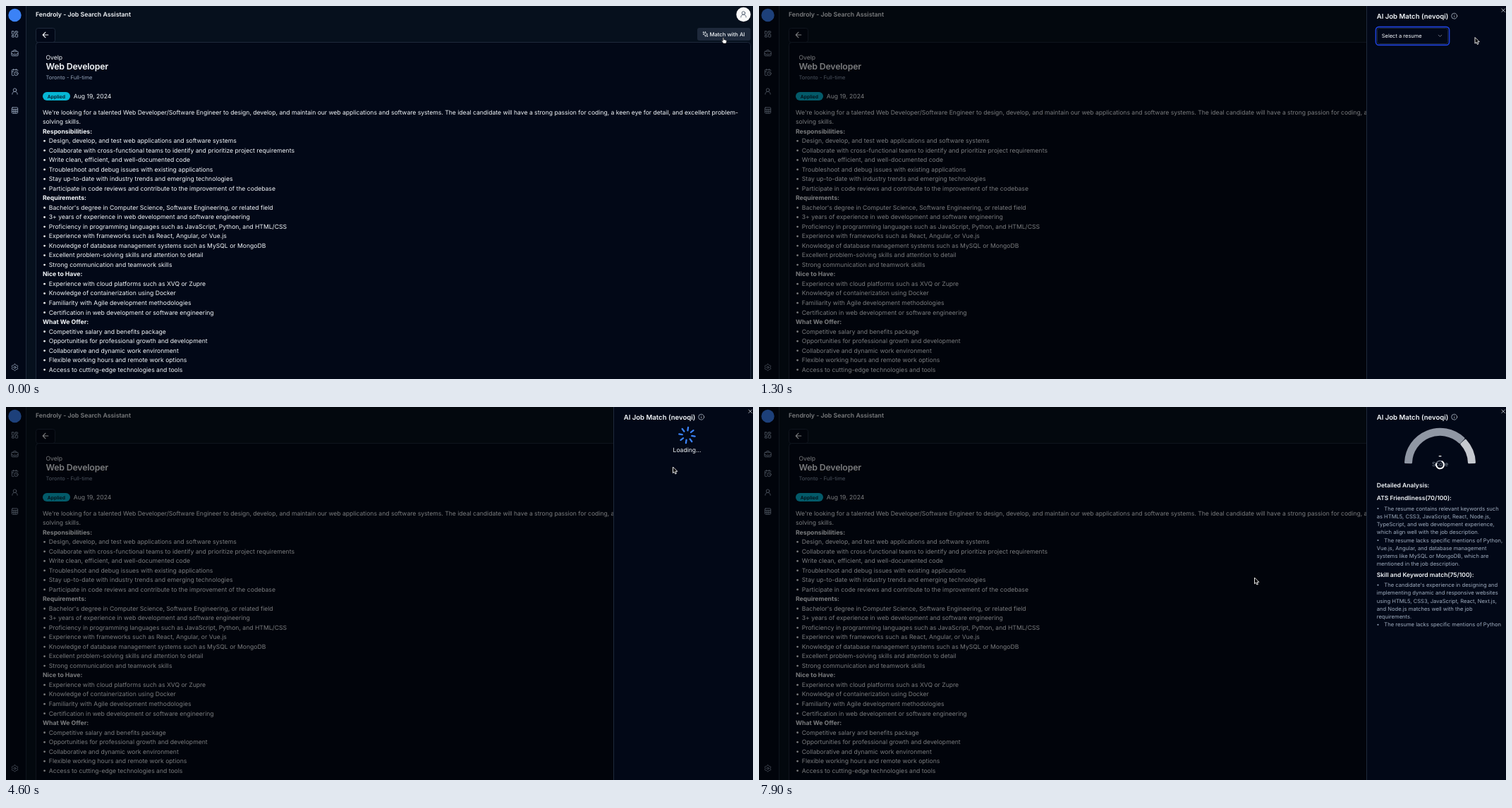
An HTML page that plays this animation: 1059 by 529 pixels, repeating every 8 s.

```html
<!DOCTYPE html>
<html lang="en">
<head>
<meta charset="utf-8">
<title>Job match</title>
<style>
  html, body { margin: 0; height: 100%; overflow: hidden; background: #020817; }
  svg { display: block; width: 100vw; height: 100vh; }
  text { font-family: Inter, sans-serif; text-rendering: geometricPrecision; white-space: pre; }
</style>
</head>
<body>
<svg id="stage" viewBox="0 0 1059 529"></svg>
<script>
const stage = document.getElementById('stage');
const LOOP = 8000, STEP = 100;
const WHITE = '#f5f8fb', MUTED = '#94a3b8', BG = '#020817', LINE = '#1e293b';

const label = (x, y, size, str, { fill = WHITE, weight = 400, extra = '' } = {}) =>
  `<text x="${x}" y="${y}" font-size="${size}" font-weight="${weight}" fill="${fill}" ${extra}>${str}</text>`;
const box = (x, y, w, h, fill, extra = '') =>
  `<rect x="${x}" y="${y}" width="${w}" height="${h}" fill="${fill}" ${extra}/>`;
// 24-unit line icon centred on (cx, cy)
const icon = (cx, cy, size, body, color = MUTED, width = 2) =>
  `<g transform="translate(${cx - size / 2} ${cy - size / 2}) scale(${size / 24})" fill="none"
    stroke="${color}" stroke-width="${width}" stroke-linecap="round" stroke-linejoin="round">${body}</g>`;
const path = d => `<path d="${d}"/>`;
const pane = (x, y, w, h, r = 1) => box(x, y, w, h, 'none', `rx="${r}"`);

const gear = () => {
  const pts = Array.from({ length: 72 }, (_, i) => {
    const a = i * Math.PI / 36, r = 8.9 + 1.2 * Math.cos(6 * a);
    return `${(12 + r * Math.sin(a)).toFixed(2)} ${(12 - r * Math.cos(a)).toFixed(2)}`;
  });
  return path(`M${pts.join('L')}Z`) + '<circle cx="12" cy="12" r="3"/>';
};
const person = '<circle cx="12" cy="8" r="5"/>' + path('M20 21a8 8 0 0 0-16 0');

const sidebar = [
  [40, pane(3, 3, 7, 9) + pane(14, 3, 7, 5) + pane(14, 12, 7, 9) + pane(3, 16, 7, 5)],
  [67, pane(2, 6, 20, 14, 2) + path('M16 6V4a2 2 0 0 0-2-2h-4a2 2 0 0 0-2 2v2M22 13a18 18 0 0 1-20 0M12 12h.01')],
  [94, path('M21 7.5V6a2 2 0 0 0-2-2H5a2 2 0 0 0-2 2v14a2 2 0 0 0 2 2h3.5M16 2v4M8 2v4M3 10h5M17.5 17.5L16 16.3V14') +
       '<circle cx="16" cy="16" r="6"/>'],
  [121, person],
  [148, pane(3, 3, 18, 18, 2) + path('M3 9h18M3 15h18M9 9v12M15 9v12')],
  [512.5, gear()],
];

// '#' marks a heading, '-' a bullet
const posting = `We're looking for a talented Web Developer/Software Engineer to design, develop, and maintain our web applications and software systems. The ideal candidate will have a strong passion for coding, a keen eye for detail, and excellent problem-
solving skills.
#Responsibilities:
-Design, develop, and test web applications and software systems
-Collaborate with cross-functional teams to identify and prioritize project requirements
-Write clean, efficient, and well-documented code
-Troubleshoot and debug issues with existing applications
-Stay up-to-date with industry trends and emerging technologies
-Participate in code reviews and contribute to the improvement of the codebase
#Requirements:
-Bachelor's degree in Computer Science, Software Engineering, or related field
-3+ years of experience in web development and software engineering
-Proficiency in programming languages such as JavaScript, Python, and HTML/CSS
-Experience with frameworks such as React, Angular, or Vue.js
-Knowledge of database management systems such as MySQL or MongoDB
-Excellent problem-solving skills and attention to detail
-Strong communication and teamwork skills
#Nice to Have:
-Experience with cloud platforms such as XVQ or Zupre
-Knowledge of containerization using Docker
-Familiarity with Agile development methodologies
-Certification in web development or software engineering
#What We Offer:
-Competitive salary and benefits package
-Opportunities for professional growth and development
-Collaborative and dynamic work environment
-Flexible working hours and remote work options
-Access to cutting-edge technologies and tools`.split('\n');

const postingLine = (line, i) => {
  const y = 153.6 + i * 13.52, rest = line.slice(1);
  if (line[0] === '#') return label(52, y, 8.7, rest, { weight: 700 });
  if (line[0] === '-') return `<circle cx="54.6" cy="${y - 2.8}" r="1.4" fill="${WHITE}"/>` + label(60.8, y, 8.62, rest);
  return label(52, y, 8.59, line);
};

const page = `
  ${box(0, 0, 1059, 529, '#06101d')}
  ${box(0, 0, 28, 529, BG)}${box(28, 0, 1, 529, LINE)}
  <circle cx="12.5" cy="13" r="9.2" fill="#3b82f6"/>
  ${sidebar.map(([y, body]) => icon(12.5, y, 11, body)).join('')}
  ${label(42, 15.2, 8.75, 'Fendroly - Job Search Assistant', { weight: 600 })}
  <circle cx="1045.5" cy="12" r="10.2" fill="#fafafa"/>
  ${icon(1045.5, 11.8, 11, person, '#475569', 1.8)}
  ${box(42.5, 31.5, 27, 20, BG, `rx="3" stroke="${LINE}"`)}
  ${icon(56, 41, 13, path('M12 19l-7-7 7-7M19 12H5'), WHITE)}
  ${box(980, 31, 75.5, 18, LINE, 'rx="3"')}
  ${icon(991.5, 40, 9, path('M12 3C12.6 8.5 15.5 11.4 21 12 15.5 12.6 12.6 15.5 12 21 11.4 15.5 8.5 12.6 3 12 8.5 11.4 11.4 8.5 12 3ZM5 3v4M3 5h4M19 17v4M17 19h4'), WHITE)}
  ${label(997.5, 42.9, 7.65, 'Match with AI', { weight: 500 })}
  ${box(42.5, 51.5, 1013, 490, BG, `rx="4" stroke="${LINE}"`)}
  ${label(56.5, 75.5, 8.6, 'Ovelp')}
  ${label(56.5, 90.3, 12.35, 'Web Developer', { weight: 600, extra: 'letter-spacing="-.2"' })}
  ${label(56.5, 104.2, 7.52, 'Toronto - Full-time', { fill: MUTED })}
  ${box(52, 122, 39, 12, '#06b6d4', 'rx="6"')}
  ${label(58.8, 130.5, 6.75, 'Applied', { fill: '#06182a', weight: 600 })}
  ${label(95.8, 130.8, 8.6, 'Aug 19, 2024')}
  ${posting.map(postingLine).join('')}`;

const roles = ['Full Stack Developer', 'Software Engineer', 'Software Architect'];
const roleY = i => 66.2 + i * 18;

// Half-ring piece between two angles in degrees, counted from the right
const gaugePiece = (from, to, fill) => {
  const at = (r, deg) => {
    const a = deg * Math.PI / 180;
    return `${(965.5 + r * Math.cos(a)).toFixed(2)} ${(80.3 - r * Math.sin(a)).toFixed(2)}`;
  };
  return `<path d="M${at(49, from)}A49 49 0 0 1 ${at(49, to)}L${at(41, to)}A41 41 0 0 0 ${at(41, from)}Z"
    fill="${fill}" stroke="${fill}" stroke-width="3" stroke-linejoin="round"/>`;
};
const spokes = Array.from({ length: 8 }, (_, i) => `<path d="M0-6.8V-11.3" transform="rotate(${i * 45})"/>`).join('');

const report = `#ATS Friendliness(70/100):
-The resume contains relevant keywords such
as HTML5, CSS3, JavaScript, React, Node.js,
TypeScript, and web development experience,
which align well with the job description.
-The resume lacks specific mentions of Python,
Vue.js, Angular, and database management
systems like MySQL or MongoDB, which are
mentioned in the job description.
#Skill and Keyword match(75/100):
-The candidate's experience in designing and
implementing dynamic and responsive websites
using HTML5, CSS3, JavaScript, React, Next.js,
and Node.js matches well with the job
requirements.
-The resume lacks specific mentions of Python`.split('\n');
let nextY = 132.4, typed = 0;
const reportLines = report.map((raw, i) => {
  const kind = '#-'.includes(raw[0]) ? raw[0] : '';
  const str = kind ? raw.slice(1) : raw;
  if (i && kind === '#') nextY += 4;
  const line = { kind, str, y: nextY, start: typed };
  nextY += kind === '#' ? 14.5 : 11.25;
  typed += str.length;
  return line;
});
const reportMarkup = reportLines.map(({ kind, y }) => {
  if (kind === '#') return `<g>${label(875.7, y, 8.5, '', { weight: 600 })}</g>`;
  const dot = kind ? `<circle cx="877.5" cy="${y - 2.9}" r="1.1" fill="${MUTED}"/>` : '';
  return `<g>${dot}${label(kind ? 886.3 : 875.7, y - .2, 7.6, '', { fill: '#a0adbf' })}</g>`;
}).join('');

const sheet = `
  ${box(861.5, -2, 400, 533, BG, `stroke="${LINE}"`)}
  ${label(875.7, 17.7, 9.58, 'AI Job Match (nevoqi)', { weight: 600 })}
  ${icon(985.7, 14.2, 9.5, '<circle cx="12" cy="12" r="10"/>' + path('M12 16v-4M12 8h.01'), '#b6c0cd')}
  ${icon(1055.2, 6.2, 9, path('M18 6L6 18M6 6l12 12'), '#e2e7ee')}
  <g id="select">
    <rect id="ring" x="874.4" y="29.6" width="104.2" height="25.8" rx="4.5" fill="none" stroke="#1e40d8" stroke-width="1.6"/>
    ${box(876.5, 31.5, 100, 22, BG, `rx="3" stroke="${LINE}"`)}
    ${label(882.7, 45, 7.52, 'Select a resume', { extra: 'id="choice"' })}
    ${icon(965.5, 42.3, 9, path('M6 9l6 6 6-6'), '#8b95a5')}
  </g>
  <g id="menu">
    ${box(877, 56.5, 99.5, 56.5, BG, `rx="3" stroke="${LINE}"`)}
    <rect id="hover" x="879.5" width="94.5" height="18" rx="2" fill="${LINE}"/>
    ${roles.map((role, i) => label(896.4, roleY(i) + 2.7, 7.62, role)).join('')}
  </g>
  <g id="loading">
    <g id="spinner" stroke="#3b82f6" stroke-width="2.3" stroke-linecap="round">${spokes}</g>
    ${label(965.5, 63.6, 8.55, 'Loading...', { extra: 'text-anchor="middle"' })}
  </g>
  <g id="result">
    <g id="gauge">${gaugePiece(178, 47, '#9097a4')}${gaugePiece(42.5, 2, '#c6c9cf')}</g>
    ${label(965.5, 72.8, 11, '-', { weight: 700, extra: 'text-anchor="middle"' })}
    ${label(965.5, 84, 8.4, 'Score', { fill: '#7d8795', extra: 'text-anchor="middle"' })}
    <circle cx="965.5" cy="81.8" r="5.5" fill="none" stroke="#6b7280" stroke-width="1.8"/>
    <path id="busy" d="M0-5.5A5.5 5.5 0 1 1-5.5 0" fill="none" stroke="#fff" stroke-width="1.9"/>
    ${label(875.7, 114.4, 8.6, 'Detailed Analysis:', { weight: 600 })}
    <g id="report">${reportMarkup}</g>
  </g>`;

stage.innerHTML = `${page}
  ${box(0, 0, 1059, 529, '#000', 'id="shade" opacity=".5"')}
  <g id="sheet">${sheet}</g>
  <g id="cursor">
    <path id="arrow" d="M0 0V8.7L2 6.9 3.4 10 4.9 9.3 3.6 6.3H6.3Z" fill="#000" stroke="#fff" stroke-width=".9"/>
    <path id="hand" d="M1.2 1C1.2-.1 2.7-.1 2.7 1V3.4C3.2 3 4 3.1 4.1 3.6 4.6 3.3 5.3 3.5 5.4 4 6 3.8 6.6 4.1 6.6 4.8
      C6.7 6.4 6.2 7.2 5.8 8.6H1.9C1.5 7.4.2 6.3-.4 5.2-.8 4.4.3 4.1 1.2 5.2Z" fill="#fff" stroke="#111" stroke-width=".6"/>
  </g>`;

const el = {};
stage.querySelectorAll('[id]').forEach(node => el[node.id] = node);
const show = (node, on) => node.setAttribute('display', on ? 'inline' : 'none');
const move = (node, value) => node.setAttribute('transform', value);
const fade = (node, value) => node.setAttribute('opacity', value);
const clamp = v => Math.min(1, Math.max(0, v));
const smooth = v => v * v * (3 - 2 * v);

// Pointer stops: [time, x, y]
const trail = [
  [0, 1015, 44.5], [1700, 1015, 44.5], [2100, 966, 38], [3000, 966, 38], [3600, 945.5, 85],
  [6700, 945.5, 85], [7400, 700.5, 245], [7500, 702.5, 242], [LOOP, 702.5, 242],
];
function cursorAt(t) {
  const i = trail.findIndex((p, k) => k && t <= p[0]);
  const [t0, x0, y0] = trail[i - 1], [t1, x1, y1] = trail[i];
  const k = smooth((t - t0) / (t1 - t0));
  return [x0 + (x1 - x0) * k, y0 + (y1 - y0) * k];
}

function draw(t) {
  const open = t >= 1000;
  show(el.shade, open);
  show(el.sheet, open);
  move(el.sheet, `translate(${200 * (1 - smooth(clamp((t - 750) / 500)))} 0)`);

  show(el.select, t < 4000);
  show(el.ring, t < 2300);
  el.choice.textContent = t < 3900 ? 'Select a resume' : roles[1];

  const menu = t < 3900 ? clamp((t - 2200) / 300) : .4;
  show(el.menu, t >= 2300 && t < 4000);
  fade(el.menu, menu);
  const zoom = .95 + .05 * menu;
  move(el.menu, `translate(927 ${85 - 4 * (1 - menu)}) scale(${zoom}) translate(-927 -85)`);

  const [x, y] = cursorAt(t);
  el.hover.setAttribute('y', roleY(y > 73 ? 1 : 0) - 9);
  move(el.cursor, `translate(${x} ${y})`);
  show(el.hand, t < 700);
  show(el.arrow, t >= 700);

  show(el.loading, t >= 4000 && t < 5800);
  move(el.spinner, `translate(965.5 40) rotate(${t * .36 + 17})`);

  show(el.result, t >= 5800);
  fade(el.gauge, clamp(.72 + (t - 6200) / 1800));
  move(el.busy, `translate(965.5 81.8) rotate(${t * .36 + 60})`);
  const count = Math.round(120 + (t - 6200) * 492 / 1700);
  reportLines.forEach(({ str, start }, i) => {
    const row = el.report.children[i];
    show(row, count > start);
    row.lastElementChild.textContent = str.slice(0, Math.max(0, count - start));
  });
}

const origin = performance.now();
function tick() {
  const t = (performance.now() - origin) % LOOP;
  draw(Math.floor(t / STEP) * STEP);
  requestAnimationFrame(tick);
}
draw(0);
requestAnimationFrame(tick);
</script>
</body>
</html>
```
